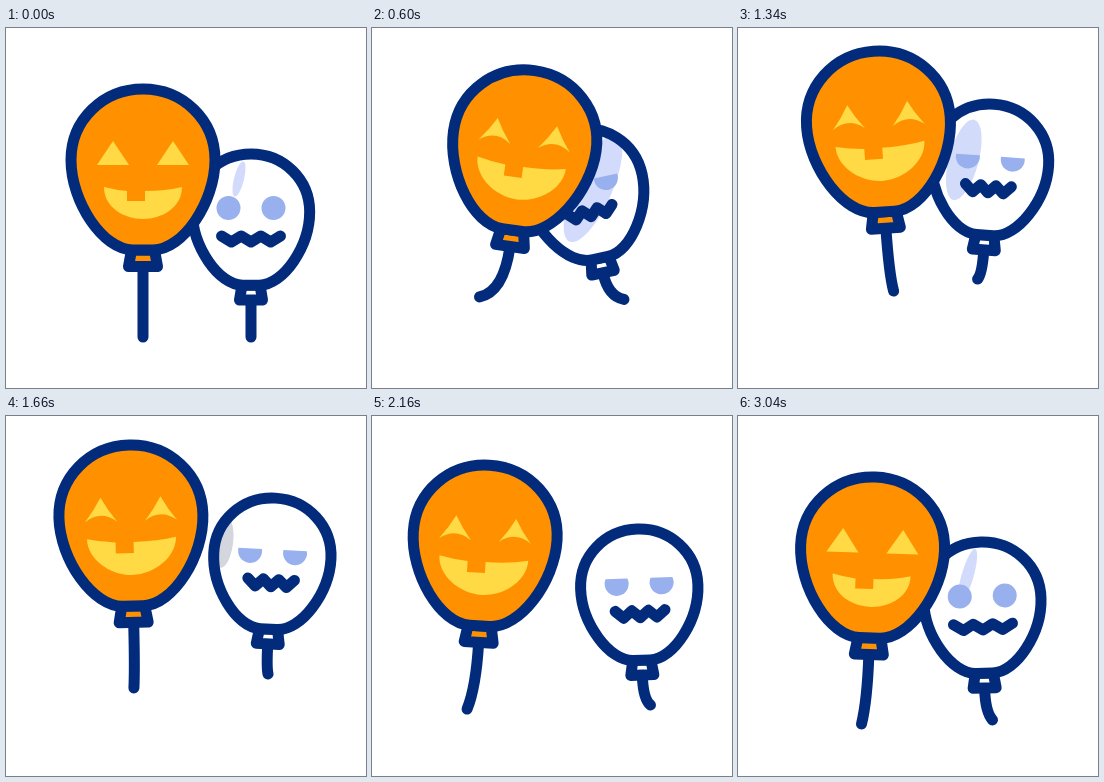
An HTML page with a canvas that plays this animation: 360x360 px, repeating every 3060 ms.

```html
<!DOCTYPE html>
<html>
<head>
<meta charset="utf-8">
<style>
html, body { margin: 0; height: 100%; overflow: hidden; background: #fff; }
canvas { display: block; width: 360px; height: 360px; }
</style>
</head>
<body>
<canvas id="stage"></canvas>
<script>
const LOOP = 3060, NAVY = '#032b7b';
const stage = document.getElementById('stage');
const ratio = window.devicePixelRatio || 1;
stage.width = stage.height = 360 * ratio;
const c = stage.getContext('2d');

// time, x, y, tilt, string end dx, dy, smile
const pumpkinKeys = [
  [0, 137, 134, 0, 0, 175, 0],
  [300, 143, 129, 4, -25, 168, .6],
  [600, 152.5, 115, 8, -45, 154, 1],
  [800, 153.5, 107, 4, -24, 163, 1],
  [1000, 151, 100, 0, -2, 167, 1],
  [1330, 141, 96, -4, 15, 167, 1],
  [1660, 125, 102, -1.5, 3, 170, 1],
  [1980, 111, 114, 1, -8, 171, 1],
  [2160, 113, 122, 3.5, -18, 171, 1],
  [2360, 128, 130, 1, -4, 173, 1],
  [2560, 139.5, 133, -4.5, 22, 173, 1],
  [2800, 136.5, 134, -1.5, 9, 174, .3],
  [3040, 134.5, 134, 2, -11, 174, 0]
];
// time, x, y, tilt, string end dx, dy, squint
const ghostKeys = [
  [0, 245, 190, 0, 0, 119, 0],
  [300, 233, 182, -6, 20, 115, .6],
  [600, 214, 164.5, -12, 38, 107, 1],
  [800, 217, 153, -7, 18, 111, 1],
  [1000, 229, 143, 0, -2, 112, 1],
  [1330, 251, 140, 4, -12, 111, 1],
  [1660, 266, 146, 3, -4, 112, .95],
  [1900, 271, 157, 1, 2, 112, .9],
  [2160, 267.5, 177, -2, 11, 112, .7],
  [2360, 256, 187, 0, -2, 112, .35],
  [2560, 246.5, 190, 2.5, -19, 109, 0],
  [2800, 244.5, 190, 1, -4, 114, 0],
  [3040, 244.5, 190, -1.5, 10, 114, 0]
];
// time, dx, dy, rx, ry, tilt, greyness
const shadeKeys = [
  [0, -12, -39, 5, 18, 14, 0],
  [600, 7, -4, 19, 58, 24, 0],
  [1000, 2, -3, 17, 55, 21, 0],
  [1330, -25, -8, 15, 42, 15, 0],
  [1660, -48, -19, 9, 25, 8, 1],
  [2160, -70, -20, 8, 25, 8, 1],
  [2560, -18, -25, 9, 36, 20, 0],
  [3040, -15, -30, 6, 28, 16, 0]
];

const clamp = v => Math.min(1, Math.max(0, v));
const mix = (a, b, u) => a + (b - a) * u;

// Smooth cubic curve through the keys
function sample(keys, t) {
  const last = keys.length - 1;
  t = Math.min(t, keys[last][0]);
  let i = 0;
  while (i < last - 1 && t > keys[i + 1][0]) i++;
  const a = keys[i], b = keys[i + 1], h = b[0] - a[0], u = (t - a[0]) / h;
  const slope = (k, n) => k === 0 || k === last ? 0 :
    (keys[k + 1][n] - keys[k - 1][n]) / (keys[k + 1][0] - keys[k - 1][0]);
  return a.slice(1).map((v, j) => {
    const n = j + 1, w = u * u * (3 - 2 * u);
    return mix(v, b[n], w) + h * u * (1 - u) * ((1 - u) * slope(i, n) - u * slope(i + 1, n));
  });
}

function skin(k, dy) {
  const p = new Path2D(), y = v => v * k + dy;
  p.moveTo(0, y(-73));
  for (const s of [1, -1]) {
    const x = v => v * k * s;
    if (s > 0) {
      p.bezierCurveTo(x(40), y(-73), x(72), y(-42), x(72), y(-2));
      p.bezierCurveTo(x(72), y(40), x(40), y(88), x(10), y(88));
    } else {
      p.lineTo(x(10), y(88));
      p.bezierCurveTo(x(40), y(88), x(72), y(40), x(72), y(-2));
      p.bezierCurveTo(x(72), y(-42), x(40), y(-73), 0, y(-73));
    }
  }
  p.closePath();
  return p;
}

function knot(top, bottom, w1, w2) {
  const p = new Path2D();
  p.moveTo(-w1, top);
  p.lineTo(w1, top);
  p.lineTo(w2, bottom);
  p.lineTo(-w2, bottom);
  p.closePath();
  return p;
}

const pumpkin = { skin: skin(1, 0), knot: knot(88, 104.5, 11.5, 14.5), fill: '#ff9100', tail: 105, bend: 45, face: pumpkinFace };
const ghost = { skin: skin(.815, -4.5), knot: knot(67, 82, 9, 11.5), fill: '#fff', tail: 83, bend: 23, face: ghostFace };

function balloon(kind, [x, y, tilt, endX, endY, mood], shade) {
  const a = tilt * Math.PI / 180, sin = Math.sin(a), cos = Math.cos(a);
  const along = d => [-sin * d, cos * d];
  c.save();
  c.translate(x, y);
  c.lineWidth = 11;
  c.lineCap = c.lineJoin = 'round';
  c.strokeStyle = NAVY;

  c.beginPath();
  c.moveTo(...along(kind.tail));
  c.quadraticCurveTo(...along(kind.tail + kind.bend), endX, endY);
  c.stroke();

  c.rotate(a);
  c.fillStyle = kind.fill;
  c.fill(kind.knot);
  c.stroke(kind.knot);
  c.fill(kind.skin);
  if (shade) drawShade(kind, shade, a);
  c.stroke(kind.skin);
  kind.face(clamp(mood));
  c.restore();
}

function drawShade(kind, [dx, dy, rx, ry, tilt, grey], a) {
  const g = clamp(grey);
  c.save();
  c.clip(kind.skin);
  c.rotate(-a);
  c.fillStyle = `rgb(211,${219 - 5 * g},${252 - 32 * g})`;
  c.beginPath();
  c.ellipse(dx, dy, Math.max(1, rx), Math.max(1, ry), tilt * Math.PI / 180, 0, 7);
  c.fill();
  c.restore();
}

function pumpkinFace(smile) {
  c.fillStyle = '#ffda44';
  for (const x of [-30, 30]) {
    c.beginPath();
    c.moveTo(x, -21);
    c.quadraticCurveTo(x + 8 - smile, -9 + smile, x + 16, 3);
    c.quadraticCurveTo(x, 3 - 12 * smile, x - 16, 3);
    c.quadraticCurveTo(x - 8 + smile, -9 + smile, x, -21);
    c.fill();
  }
  const w = mix(39, 44.5, smile), top = mix(25, 20, smile), lip = top + 4;
  const tooth = mix(39, 35, smile);
  c.beginPath();
  c.moveTo(-w, top);
  c.quadraticCurveTo(-w * .7, lip - 1, -16, lip);
  c.lineTo(-16, tooth);
  c.lineTo(2, tooth);
  c.lineTo(2, lip);
  c.quadraticCurveTo(w * .6, lip, w, top);
  c.bezierCurveTo(w, top + 20, w * .5, 57, 0, 57);
  c.bezierCurveTo(-w * .5, 57, -w, top + 20, -w, top);
  c.fill();
}

function ghostFace(squint) {
  const lid = Math.asin(1 - squint * 10 / 12);
  c.fillStyle = '#98b0ee';
  for (const x of [-22.5, 22.5]) {
    c.beginPath();
    c.arc(x, -10, 12, -lid, Math.PI + lid);
    c.fill();
  }
  const w = mix(29.5, 23, squint), h = mix(3, 3.8, squint);
  c.beginPath();
  for (let i = 0; i <= 6; i++) c.lineTo(w * (i / 3 - 1), 21 + (i % 2 ? h : -h));
  c.stroke();
}

function frame(now) {
  const t = (now - start) % LOOP;
  c.setTransform(ratio, 0, 0, ratio, 0, 0);
  c.fillStyle = '#fff';
  c.fillRect(0, 0, 360, 360);
  balloon(ghost, sample(ghostKeys, t), sample(shadeKeys, t));
  balloon(pumpkin, sample(pumpkinKeys, t));
  requestAnimationFrame(() => frame(performance.now()));
}

const start = performance.now();
frame(start);
</script>
</body>
</html>
```
